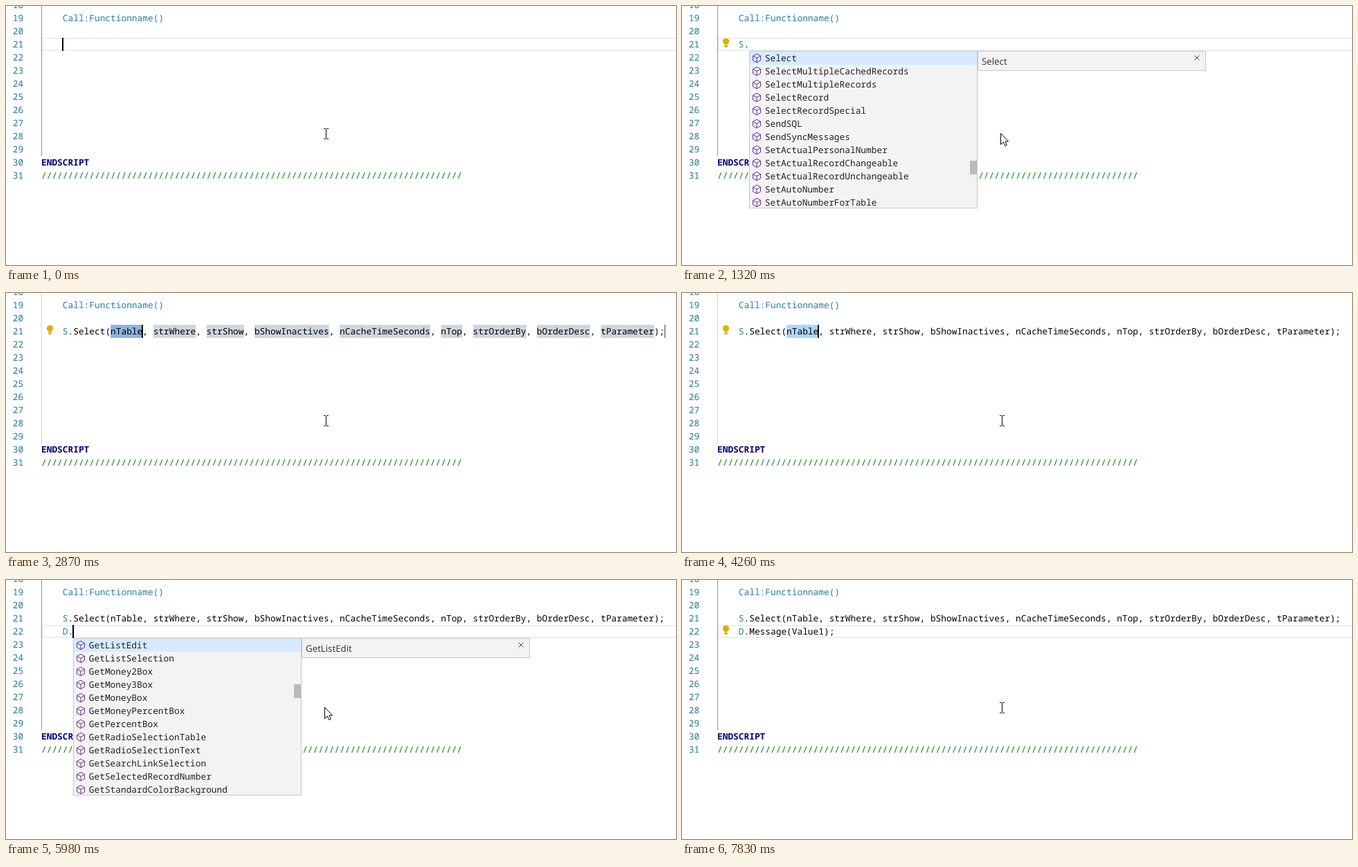
Recreate the animation shown at these times as an HTML page. Size 968x375 px, loop 8000 ms.

```html
<!DOCTYPE html>
<html lang="en">
<head>
<meta charset="utf-8">
<title>Code completion</title>
<style>
  html, body { margin: 0; width: 100%; height: 100%; overflow: hidden; background: #fff; }
  svg { display: block; }
  text { white-space: pre; text-rendering: geometricPrecision; }
  .code { font: 12.8333px "Noto Sans Mono", "DejaVu Sans Mono", monospace; }
  .ui { font: 13.3px "Open Sans", "Noto Sans", sans-serif; fill: #333; }
  .match { fill: #0066bf; font-weight: bold; }
</style>
</head>
<body>
<svg id="stage" width="968" height="375" viewBox="0 0 968 375"></svg>
<script>
const LOOP = 8000, CHAR = 7.7, ROW = 19, LEFT = 51, INDENT = LEFT + 4 * CHAR;
const TYPE = "#267f99";
const CALL = "S.Select(nTable, strWhere, strShow, bShowInactives, nCacheTimeSeconds, nTop, strOrderBy, bOrderDesc, tParameter);";
const PARAMS = CALL.slice(9, -2).split(", ");

const words = s => s.trim().split(/\s+/);
const S_ITEMS = words(`Select SelectMultipleCachedRecords SelectMultipleRecords SelectRecord
  SelectRecordSpecial SendSQL SendSyncMessages SetActualPersonalNumber SetActualRecordChangeable
  SetActualRecordUnchangeable SetAutoNumber SetAutoNumberForTable`);
const D_ITEMS = words(`GetListEdit GetListSelection GetMoney2Box GetMoney3Box GetMoneyBox
  GetMoneyPercentBox GetPercentBox GetRadioSelectionTable GetRadioSelectionText
  GetSearchLinkSelection GetSelectedRecordNumber GetStandardColorBackground`);
const M_ITEMS = words(`Message MessageBoxOK MoveAllElements MyDialogAddElement
  MyDialogAddMessageHandler MyDialogDestroy MyDialogRewriteAllElements ErrorMessage
  GetMoney2Box GetMoney3Box GetMoneyBox GetMoneyPercentBox`);
const MESSAGES = words(`Message MessageBoxOK MyDialogAddMessageHandler ErrorMessage
  ParentSimulateChangedMessage SendChangedMessage SimulateChangedMessage StatusMessage`);
// Brackets mark matches that are not one contiguous run.
const ME_ITEMS = MESSAGES.concat(words(`[M]oveAll[E]lements [M]yDialogAdd[E]lement
  [M]yDialogD[e]stroy [M]yDialogR[e]writeAllElements`));
const MES_ITEMS = MESSAGES.concat(words(`[M]oveAll[E]lement[s] [M]yDialogD[es]troy
  [M]yDialogRewriteAll[E]lement[s]`));

const list = (items, query, thumbY, thumbH) => ({ items, query, thumbY, thumbH });

// Each step changes only the named parts of the state.
const steps = [
  [0, { row: 21, col: 4, caret: true, line21: "", line22: "", highlight: 21, bulb: 0,
        popup: null, details: false, snippet: false, selected: false }],
  [140, { caret: false }],
  [540, { line21: "S", col: 5, caret: true }],
  [768, { bulb: 21 }],
  [844, { line21: "S.", col: 6, popup: list(S_ITEMS, "", 159, 20) }],
  [920, { details: true }],
  [1320, { caret: false }],
  [1470, { line21: "S.S", col: 7, caret: true, popup: list(S_ITEMS, "S", 1, 35) }],
  [1930, { caret: false }],
  [2400, { caret: true }],
  [2870, { line21: CALL, col: 19, popup: null, details: false, snippet: true, selected: true, highlight: 0 }],
  [3330, { caret: false }],
  [3880, { caret: true }],
  [4260, { snippet: false }],
  [4340, { caret: false }],
  [4660, { selected: false, row: 22, col: 0, caret: true, highlight: 22 }],
  [4890, { bulb: 0 }],
  [5120, { caret: false }],
  [5210, { col: 4, caret: true }],
  [5670, { caret: false }],
  [5750, { line22: "D", col: 5, caret: true }],
  [5903, { line22: "D.", col: 6, popup: list(D_ITEMS, "", 67, 20) }],
  [5980, { details: true }],
  [6210, { line22: "D.M", col: 7, popup: list(M_ITEMS, "M", 1, 40) }],
  [6280, { bulb: 22 }],
  [6510, { line22: "D.Me", col: 8, popup: list(ME_ITEMS, "Me", 1, 85) }],
  [6820, { line22: "D.Mes", col: 9, popup: list(MES_ITEMS, "Mes", 0, 0) }],
  [7290, { caret: false }],
  [7370, { line22: "D.Message(Value1);", col: 22, caret: true, popup: null, details: false }],
  [7830, { caret: false }]
];

const rowTop = n => 8 + (n - 19) * ROW;
const rect = (x, y, w, h, fill, extra = "") =>
  `<rect x="${x}" y="${y}" width="${w}" height="${h}" fill="${fill}" ${extra}/>`;
const path = (d, stroke, extra = "") =>
  `<path d="${d}" fill="none" stroke="${stroke}" ${extra}/>`;
const text = (x, y, s, fill, extra = "") =>
  `<text class="code" x="${x}" y="${y}" fill="${fill}" ${extra}>${s}</text>`;
const line = (n, x, s, fill, extra) => text(x, rowTop(n) + 14, s, fill, extra);
const statement = (n, s) =>
  s && line(n, INDENT, `<tspan fill="${TYPE}">${s[0]}</tspan>${s.slice(1)}`, "#000");
const panel = (x, y, w, h) =>
  rect(x + .5, y + .5, w - 1, h - 1, "#f3f3f3", 'stroke="#c8c8c8"');

function highlightBox(n) {
  return n ? rect(LEFT + 1, rowTop(n) + 1, 930, ROW - 2, "none", 'stroke="#eee" stroke-width="2"') : "";
}

function placeholders(state) {
  const y = rowTop(21);
  let x = INDENT + 9 * CHAR, out = "";
  if (state.selected) out += rect(x, y, 6 * CHAR, ROW, "#add6ff");
  if (!state.snippet) return out;
  for (const p of PARAMS) {
    out += rect(x, y, p.length * CHAR, ROW, "#0a3264", 'opacity=".2"');
    x += (p.length + 2) * CHAR;
  }
  return out + rect(951, y, 2, ROW, "#0a3264", 'opacity=".5"');
}

function bulb(n) {
  if (!n) return "";
  return `<g transform="translate(63.5 ${rowTop(n)})">
    <path d="M-2.3 10.5V9.2C-3.8 8-4.8 7-4.8 5.2A4.8 4.5 0 0 1 4.8 5.2C4.8 7 3.8 8 2.3 9.2V10.5Z" fill="#ddb100"/>
    <path d="M-2.3 11.2H2.3V12.4L1 14H-1L-2.3 12.4Z" fill="#c9a416"/></g>`;
}

const cube = (x, y) => path(`M${x} ${y - 6.2}l5.5 3v6.4l-5.5 3l-5.5-3v-6.4zM${x - 5.5} ${y - 3.2}l5.5 3l5.5-3M${x} ${y - .2}v6.4`,
  "#652d90", 'stroke-linejoin="round"');

function label(name, query) {
  const marked = query && !name.includes("[") ? name.replace(query, "[$&]") : name;
  return marked.replace(/\[(\w+)\]/g, '<tspan class="match">$1</tspan>');
}

function popup({ popup: p, details, row, col }) {
  if (!p) return "";
  const x = Math.round(LEFT + col * CHAR), y = rowTop(row + 1);
  let out = panel(x, y, 330, p.items.length * ROW) + rect(x + 1, y + 1, 328, ROW, "#d6ebff");
  p.items.forEach((name, i) => {
    const top = y + i * ROW;
    out += cube(x + 11, top + 10.5) + text(x + 22.8, top + 15, label(name, p.query), "#222");
  });
  if (p.thumbH) out += rect(x + 319, y + p.thumbY, 10, p.thumbH, "#bababa");
  if (details) {
    out += panel(x + 330, y, 330, 29) +
      `<text class="ui" x="${x + 336}" y="${y + 20}">${p.items[0]}</text>` +
      path(`M${x + 643.5} ${y + 6.5}l7 7m0-7l-7 7`, "#444");
  }
  return out;
}

const pointer = arrow => arrow
  ? path("M460.5 184.5V200.5L464.2 197L466.7 202.5L469.3 201.4L466.9 196H471.5Z", "#000", 'style="fill:#fff"')
  : path("M459 177.5H461.5L462.5 178.5L463.5 177.5H466M459 192.5H461.5L462.5 191.5L463.5 192.5H466M462.5 178V192", "#000");

function draw(state) {
  let out = highlightBox(state.highlight) +
    rect(LEFT, 0, 1, 217, state.highlight ? "#939393" : "#d3d3d3") + placeholders(state);
  for (let n = 18; n <= 31; n++) out += line(n, 9.8, n, "#237893");
  out += line(19, INDENT, "Call:Functionname()", TYPE) +
    statement(21, state.line21) + statement(22, state.line22) +
    line(30, LEFT, "ENDSCRIPT", "#000080", 'font-weight="bold" style="font-weight:bold"') +
    line(31, LEFT, "/".repeat(79), "#008000");
  if (state.caret) {
    const x = Math.max(LEFT, Math.round(LEFT + state.col * CHAR) - 1);
    out += rect(x, rowTop(state.row), 2, ROW, "#000");
  }
  return out + bulb(state.bulb) + popup(state) + pointer(state.details);
}

const stage = document.getElementById("stage");
const start = performance.now();
let shown = -1;

function render(time) {
  const count = steps.filter(([t]) => t <= time).length;
  if (count === shown) return;
  shown = count;
  stage.innerHTML = draw(Object.assign({}, ...steps.slice(0, count).map(s => s[1])));
}

function tick() {
  render((performance.now() - start) % LOOP);
  requestAnimationFrame(tick);
}
tick();
</script>
</body>
</html>
```
